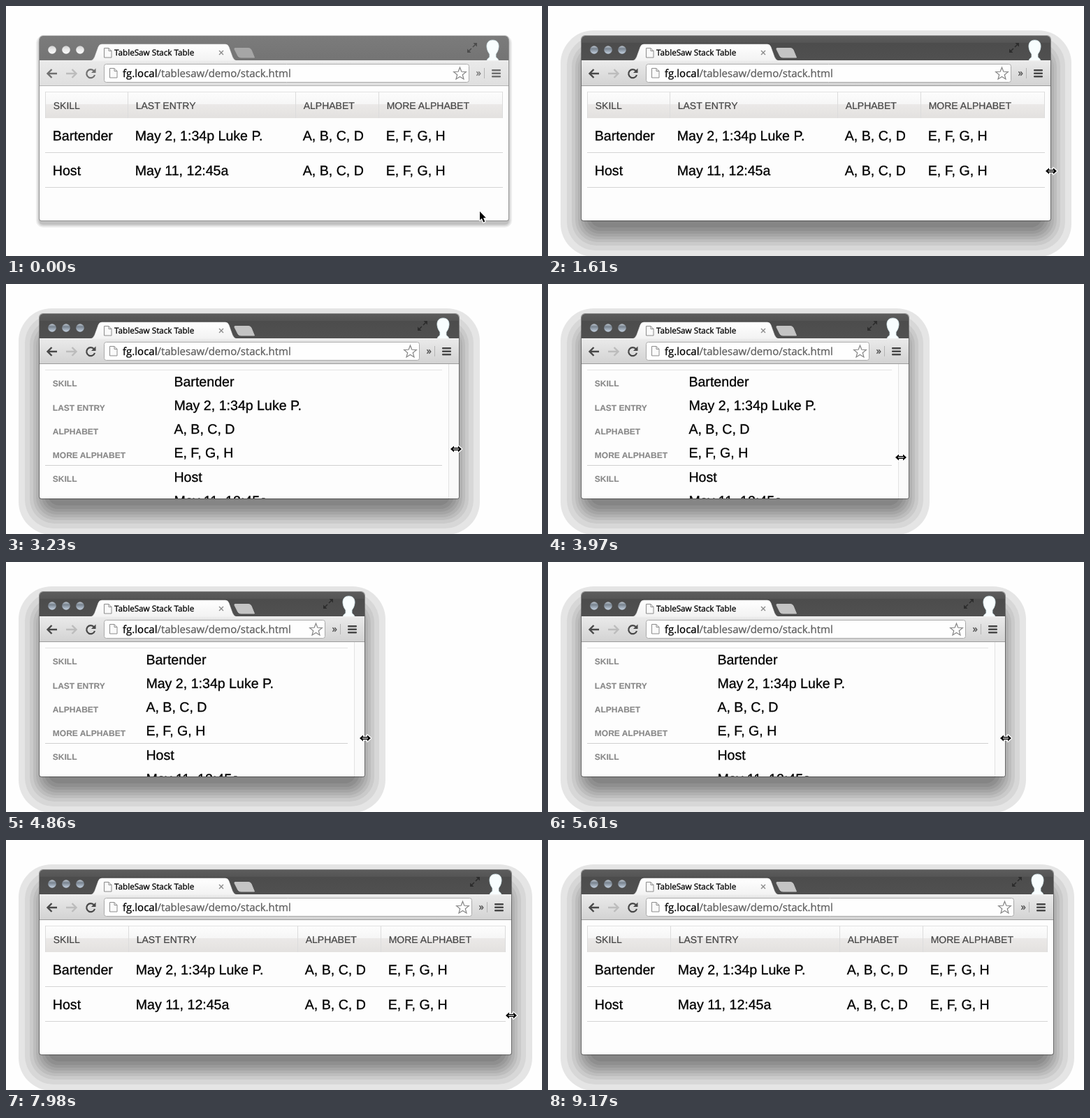
An HTML page with a canvas for the animation above (9380 ms loop, 767 px wide and 359 px high).

```html
<!DOCTYPE html>
<html lang="en">
<head>
<meta charset="utf-8">
<title>Stack table</title>
<style>
html, body { margin: 0; height: 100%; overflow: hidden; background: #fefefe; }
canvas { display: block; }
</style>
</head>
<body>
<canvas id="stage" width="767" height="359"></canvas>
<script>
const ctx = document.getElementById('stage').getContext('2d');
const LOOP = 9380, FOCUS_AT = 570, TICK = 148.2;
const LEFT = 48, TOP = 43, BOTTOM = 308, BREAKPOINT = 688;
const SANS = '"Liberation Sans", Arial, sans-serif';
const UI = '"Open Sans", "Noto Sans", sans-serif';

const HEADERS = ['SKILL', 'LAST ENTRY', 'ALPHABET', 'MORE ALPHABET'];
const ROWS = [
  ['Bartender', 'May 2, 1:34p Luke P.', 'A, B, C, D', 'E, F, G, H'],
  ['Host', 'May 11, 12:45a', 'A, B, C, D', 'E, F, G, H'],
];
const COLUMNS = [0, 0.1806, 0.54725, 0.7285, 1];

// tick, right window edge, cursor x, cursor y, easing power
const KEYS = [
  [2, 719, 678, 295], [7, 719, 720, 237], [11, 719, 720, 237],
  [18, 648, 644, 237, 2], [19, 611, 606, 238], [23, 516, 505, 249],
  [25, 476, 476, 252], [27, 476, 476, 252], [30, 544, 546, 253, 1.5],
  [34, 654, 655, 253], [41, 710, 712, 252], [42, 717, 718, 252],
  [44, 723, 723, 252], [53, 723, 723, 252], [58, 723, 736, 362],
];

function pose(tick) {
  const next = KEYS.findIndex(key => key[0] >= tick);
  if (next < 1) return KEYS[next < 0 ? KEYS.length - 1 : 0].slice(1, 4);
  const a = KEYS[next - 1], b = KEYS[next];
  const u = ((tick - a[0]) / (b[0] - a[0])) ** (b[4] || 1);
  return [1, 2, 3].map(i => Math.round(a[i] + (b[i] - a[i]) * u));
}

function rect(x, y, w, h, fill) {
  ctx.fillStyle = fill;
  ctx.fillRect(x, y, w, h);
}

// A hairline stroke gives the slightly heavy look of smoothed screen text.
function text(str, x, y, font, color, weight = 0.3) {
  ctx.font = font;
  ctx.fillStyle = ctx.strokeStyle = color;
  ctx.lineWidth = weight;
  ctx.fillText(str, x, y);
  ctx.strokeText(str, x, y);
}

function shape(path, fill, stroke, width = 1) {
  if (typeof path === 'string') path = new Path2D(path);
  if (fill) { ctx.fillStyle = fill; ctx.fill(path); }
  if (stroke) { ctx.strokeStyle = stroke; ctx.lineWidth = width; ctx.stroke(path); }
}

function rounded(x, y, w, h, r) {
  const path = new Path2D();
  path.roundRect(x, y, w, h, r);
  return path;
}

function vertical(y0, y1, ...stops) {
  const g = ctx.createLinearGradient(0, y0, 0, y1);
  stops.forEach(([at, color]) => g.addColorStop(at, color));
  return g;
}

function at(x, y, draw) {
  ctx.save();
  ctx.translate(x, y);
  draw();
  ctx.restore();
}

function shadow(right, active) {
  const spreads = active ? [30, 21, 14, 9, 5, 1, -3, -7, -12] : [5, 3, 1];
  const dy = active ? 22 : 5;
  spreads.forEach((s, i) => {
    const v = active ? 229 - i * 14 + i * i * 0.25 : 236 - i * 22;
    const r = active ? 25 + s * 0.75 : 5 + s;
    shape(rounded(LEFT - s, TOP + dy - s, right - LEFT + 2 * s, BOTTOM - TOP + 2 * s, r),
      `rgb(${v},${v},${v})`);
  });
}

function page(x, y) {
  at(x + 0.5, y + 0.5, () =>
    shape('M0 0H6.5L10.5 4V13.5H0ZM6.5 0V4H10.5', '#fafafa', '#8c8c8c'));
}

function titleBar(right, active) {
  rect(LEFT, TOP, right - LEFT, 35, active
    ? vertical(43, 78, [0, '#5c5c5c'], [0.27, '#555'], [0.28, '#4c4c4c'], [1, '#505050'])
    : vertical(43, 78, [0, '#7b7b7b'], [1, '#747474']));
  for (const x of [66, 86, 106]) {
    const dot = new Path2D();
    dot.arc(x, 63, 5.8, 0, 7);
    shape(dot, active
      ? vertical(57, 69, [0, '#c5cdd6'], [0.35, '#78838f'], [1, '#c6d3e2'])
      : vertical(57, 69, [0, '#cfcfcf'], [0.5, '#ececec'], [1, '#fafafa']));
  }
  shape('M121 79Q125 78 127 73L132 59Q133.500 55 137 55H314Q317.500 55 319 59L324 73Q326 78 330 79Z',
    vertical(55, 79, [0, '#fff'], [1, '#f2f2f2']), '#f2f2f2', 0.6);
  const button = active ? '#c4c4c4' : '#a6a6a6';
  shape('M328 60.500H347Q350 60.500 351 63L355.500 74H336Q333 74 332 72L327 62Q326.500 60.500 328 60.500Z',
    button, button);
  page(140, 60);
  text('TableSaw Stack Table', 155, 71, '11.7px ' + UI, '#000');
  shape('M305 64L311 70M311 64L305 70', null, '#8a8a8a', 1.4);

  at(right - 52, 60, () => {
    const color = active ? '#2c2c2c' : '#4c4c4c';
    shape('M1 -1L5 -5M-1 1L-5 5', null, color, 1.6);
    shape('M1.500 -7H7V-1.500ZM-7 1.500V7H-1.500Z', color);
  });
  at(right - 22.5, 49, () => shape(
    'M0 0C6 0 9 4 8.500 10C8 15 6 18 4.500 20V24C5 26 8 26 8.500 30H-8.500C-8 26 -5 26 -4.500 24V20C-6 18 -8 15 -8.500 10C-9 4 -6 0 0 0Z',
    '#f8fdfe', '#d8ecf1', 0.8));
}

function toolBar(right, active) {
  const ink = active ? '#484848' : '#707070';
  rect(LEFT, 78, right - LEFT, 36, vertical(78, 114, [0, '#f2f2f2'], [0.06, '#e9e9e9'], [1, active ? '#d3d3d3' : '#dfdfdf']));
  rect(LEFT, 114, right - LEFT, 1, active ? '#9c9c9c' : '#b4b4b4');
  shape('M73 97H60M65.500 91L59.500 97L65.500 103', null, ink, 2.4);
  shape('M86 97H99M94.500 91L100.500 97L94.500 103', null, '#bcbcbc', 2.4);
  shape('M126 93.500A6 6 0 1 0 127 99', null, ink, 2.2);
  shape('M128.500 89.500V96H122Z', ink);

  shape(rounded(140.5, 83.5, right - 197, 26, 3), '#fefefe', '#aaa');
  page(148, 89);
  const host = 'fg.local', font = '15px ' + UI;
  text(host, 167, 102, font, '#000');
  text('/tablesaw/demo/stack.html', 167 + ctx.measureText(host).width, 102, font, '#606060');

  const star = new Path2D();
  for (let i = 0; i < 10; i++) {
    const r = i % 2 ? 4 : 9.3, a = i * Math.PI / 5;
    star.lineTo(right - 69.5 + r * Math.sin(a), 97.5 - r * Math.cos(a));
  }
  star.closePath();
  shape(star, '#fff', '#858585', 1.2);
  text('»', right - 46.5, 101, '15px ' + UI, ink);
  rect(right - 35, 89, 1, 15, '#b5b5b5');
  for (const y of [91, 95.5, 100]) shape(rounded(right - 24, y, 13, 2.6, 1), ink);
}

function wideTable(right) {
  const width = right - 8 - 56;
  const edges = COLUMNS.map(c => Math.round(56 + c * width));
  rect(56, 123, width, 38, vertical(123, 161,
    [0, '#fdfdfd'], [0.47, '#f6f6f6'], [0.48, '#ebe9e8'], [1, '#e3e1df']));
  rect(56, 123, width, 1, '#e2e2e2');
  edges.forEach((x, i) => rect(i === 4 ? x - 1 : x, 123, 1, 38, '#dcdcdc'));
  HEADERS.forEach((h, i) => text(h, edges[i] + 11.7, 148, '14px ' + SANS, '#444', 0.2));
  ROWS.forEach((row, r) => {
    row.forEach((cell, i) => text(cell, edges[i] + 10.8, 193 + r * 50, '19.6px ' + SANS, '#000'));
    rect(56, 210 + r * 50, width, 1, '#d5d5d5');
  });
}

function stackedTable(right) {
  const width = right - 24 - 56;
  rect(right - 15, 115, 15, 193, '#fafafa');
  rect(right - 15, 115, 1, 193, '#e2e2e2');
  rect(56, 123, width, 1, '#e4e4e4');
  rect(56, 260, width, 1, '#d0d0d0');
  ROWS.forEach((row, r) => row.forEach((cell, i) => {
    const y = 147 + r * 137 + i * 34;
    text(HEADERS[i], 66.8, y + (i % 4 ? 1 : 0), 'bold 12px ' + SANS, '#888', 0.1);
    text(cell, Math.round(70 + width * 0.3) + 0.4, y, '19.6px ' + SANS, '#000');
  }));
}

function cursor(x, y, resizing) {
  const path = new Path2D(resizing
    ? 'M-8 0L-3 -4.500V-2H3V-4.500L8 0L3 4.500V2H-3V4.500Z'
    : 'M0 0V12.500L2.900 10L5.200 15.500L7.300 14.600L5 9.300H8.800Z');
  at(x, y, () => {
    ctx.lineJoin = 'round';
    shape(path, null, '#fff', 2.6);
    shape(path, '#000');
    if (resizing) rect(-4, -0.6, 8, 1.2, '#fff');
  });
}

function draw(now) {
  const tick = Math.floor((now % LOOP - FOCUS_AT) / TICK + 0.08);
  const active = tick >= 0;
  const [right, x, y] = pose(tick);

  ctx.textRendering = 'geometricPrecision';
  rect(0, 0, 767, 359, '#fefefe');
  shadow(right, active);

  const frame = rounded(LEFT, TOP, right - LEFT, BOTTOM - TOP, [5, 5, 3, 3]);
  shape(frame, null, active ? 'rgba(0,0,0,0.38)' : 'rgba(0,0,0,0.25)', 2);
  ctx.save();
  ctx.clip(frame);
  rect(LEFT, TOP, right - LEFT, BOTTOM - TOP, '#fdfdfd');
  titleBar(right, active);
  toolBar(right, active);
  (right > BREAKPOINT ? wideTable : stackedTable)(right);
  ctx.restore();

  cursor(x, y, tick >= 7 && tick < 54);
  requestAnimationFrame(draw);
}
requestAnimationFrame(draw);
</script>
</body>
</html>
```
